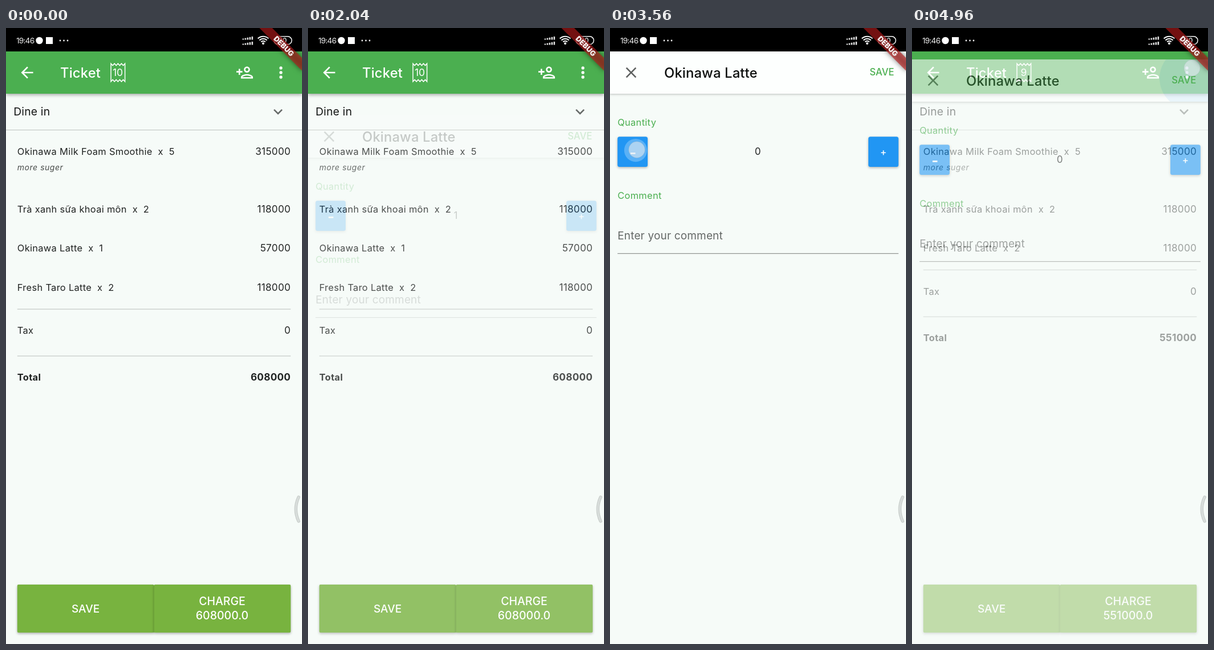
An HTML page with a canvas that plays this animation: 519 by 1078 pixels, repeating every 5000 ms.

```html
<!DOCTYPE html>
<html lang="en">
<head>
<meta charset="utf-8">
<title>Ticket</title>
<style>
html, body { margin: 0; width: 100%; height: 100%; overflow: hidden; background: #f6fbf8; }
canvas { display: block; width: 519px; height: 1078px; }
</style>
</head>
<body>
<canvas id="stage" width="519" height="1078"></canvas>
<script>
const W = 519, H = 1078, TOP = 41, LOOP = 5000;
const BG = '#f6fbf8', INK = '#202322', GREEN = '#4baf50', LIME = '#78b33f', BLUE = '#2196f3';
const FONT = 'Inter, Roboto, sans-serif';
const DP = 1.32;
const PAD = 10 * DP, EDGE = 15 * DP, TITLE = 72 * DP;

const stage = document.getElementById('stage').getContext('2d');
const layer = document.createElement('canvas');
layer.width = W;
layer.height = H;
const sheet = layer.getContext('2d');
let c = stage;

const ICONS = {
  back: 'M20 11H7.83l5.59-5.59L12 4l-8 8 8 8 1.41-1.41L7.83 13H20z',
  close: 'M19 6.41L17.59 5 12 10.59 6.41 5 5 6.41 10.59 12 5 17.59 6.41 19 12 13.41 17.59 19 19 17.59 13.41 12z',
  more: 'M16.59 8.59L12 13.17 7.41 8.59 6 10l6 6 6-6z',
  addUser: 'M15 12c2.21 0 4-1.79 4-4s-1.79-4-4-4-4 1.79-4 4 1.79 4 4 4zm0-6c1.1 0 2 .9 2 2s-.9 2-2 2-2-.9-2-2 .9-2 2-2z' +
    'm0 8c-2.67 0-8 1.34-8 4v2h16v-2c0-2.66-5.33-4-8-4zm-6 4c.22-.72 3.31-2 6-2 2.7 0 5.8 1.29 6 2H9z' +
    'm-3-3v-3h3v-2H6V7H4v3H1v2h3v3z'
};

const clamp = (v) => Math.max(0, Math.min(1, v));
const span = (t, a, b) => clamp((t - a) / (b - a));

// Cubic bezier easing, solved by bisection
function bezier(x1, y1, x2, y2) {
  const at = (a, b, s) => 3 * (1 - s) * (1 - s) * s * a + 3 * (1 - s) * s * s * b + s * s * s;
  return (x) => {
    let lo = 0, hi = 1;
    for (let i = 0; i < 24; i++) {
      const mid = (lo + hi) / 2;
      if (at(x1, x2, mid) < x) lo = mid; else hi = mid;
    }
    return at(y1, y2, lo);
  };
}
const easeIn = bezier(0.42, 0, 1, 1);
const fastOutSlowIn = bezier(0.4, 0, 0.2, 1);

function text(str, x, y, size, { color = INK, weight = 400, align = 'left', style = 'normal', gap = 0 } = {}) {
  c.font = `${style} ${weight} ${size}px ${FONT}`;
  c.letterSpacing = gap + 'px';
  c.textAlign = align;
  c.fillStyle = color;
  c.fillText(str, x, y);
}

// Text styles shared by both pages
const BODY = { gap: 0.25 * DP };
const LABEL = { ...BODY, color: GREEN };
const FIELD = { gap: 0.15 * DP };
const HEADING = { ...FIELD, weight: 500 };
const BUTTON = { color: '#fff', weight: 500, align: 'center' };

function box(x, y, w, h, color, r = 0) {
  c.fillStyle = color;
  c.beginPath();
  c.roundRect(x, y, w, h, r);
  c.fill();
}

function raised(x, y, w, h, color, r, alpha, blur, dy) {
  c.save();
  c.shadowColor = `rgba(0,0,0,${alpha})`;
  c.shadowBlur = blur;
  c.shadowOffsetY = dy;
  box(x, y, w, h, color, r);
  c.restore();
}

function disc(x, y, r, color) {
  c.fillStyle = color;
  c.beginPath();
  c.arc(x, y, r, 0, 7);
  c.fill();
}

function icon(name, x, y, color) {
  c.save();
  c.translate(x, y);
  c.scale(DP, DP);
  c.translate(-12, -12);
  c.fillStyle = color;
  c.fill(new Path2D(ICONS[name]));
  c.restore();
}

function badge(count) {
  const l = 184, r = 208.6, n = 8;
  c.beginPath();
  for (let i = 0; i <= n; i++) c.lineTo(l + (r - l) * i / n, i % 2 ? 65.6 : 62.2);
  for (let i = n; i >= 0; i--) c.lineTo(l + (r - l) * i / n, i % 2 ? 90.4 : 93.8);
  c.closePath();
  c.strokeStyle = '#fff';
  c.lineWidth = 1.5;
  c.stroke();
  text(count, 196, 84.2, 17.5, { color: '#fff', align: 'center' });
}

function row(name, value, y, weight = 400) {
  text(name, EDGE, y, 16.4, { ...BODY, weight });
  text(value, W - EDGE, y, 17.1, { ...BODY, weight, align: 'right' });
}

function ticketPage(order) {
  box(0, TOP, W, H - TOP, BG);
  raised(0, TOP, W, 74, GREEN, 0, 0.35, 6, 2);
  icon('back', 37, 78, '#fff');
  text('Ticket', TITLE, 86.5, 23.7, { ...HEADING, color: '#fff' });
  badge(order.count);
  icon('addUser', 418.5, 78, '#fff');
  for (const y of [70, 78, 86]) disc(482, y, 2.64, '#fff');

  text('Dine in', PAD, 153.4, 19.3, { ...FIELD, color: '#141615' });
  icon('more', 477, 146.5, '#666a68');
  box(0, 178, W, 1, '#bec3c0');

  row('Okinawa Milk Foam Smoothie\u00a0 x\u00a0 5', '315000', 222.2);
  text('more suger', EDGE, 248.5, 14, { color: '#484c4a', style: 'italic', gap: 0.4 * DP });
  let y = 322.5;
  for (const [name, price] of order.items) {
    row(name, price, y);
    y += 68.7;
  }
  const end = y - 36.6;
  box(EDGE, end - 0.5, W - 2 * EDGE, 1.1, '#b9bebb');
  row('Tax', '0', end + 43.4);
  box(EDGE, end + 81.5, W - 2 * EDGE, 1.1, '#b9bebb');
  row('Total', order.total, end + 124.8, 700);

  const half = W / 2 - EDGE;
  for (const x of [EDGE, W / 2]) raised(x, 974, half, 84, LIME, 2, 0.3, 4, 2);
  box(259, 975, 1, 83, '#6ca338');
  text('SAVE', 139.5, 1022.8, 19, BUTTON);
  text('CHARGE', 379, 1010.2, 19.5, BUTTON);
  text(order.total + '.0', 379, 1035.2, 19.5, BUTTON);
}

const latte = ['Okinawa Latte\u00a0 x\u00a0 1', '57000'];
const tea = ['Trà xanh sữa khoai môn\u00a0 x\u00a0 2', '118000'];
const taro = ['Fresh Taro Latte\u00a0 x\u00a0 2', '118000'];
const before = { count: '10', items: [tea, latte, taro], total: '608000' };
const after = { count: '9', items: [tea, taro], total: '551000' };

// Ripple clipped to the rectangle of its button
function ripple(x, y, r, color, clip) {
  c.save();
  c.beginPath();
  c.roundRect(...clip);
  c.clip();
  disc(x, y, r, color);
  c.restore();
}

function editPage(t) {
  box(0, TOP, W, H - TOP, BG);
  raised(0, TOP, W, 74, '#fdfffe', 0, 0.26, 4, 1);
  icon('close', 37, 78, '#5e6160');
  text('Okinawa Latte', TITLE, 86.5, 23.7, { ...HEADING, color: '#0c0e0d' });
  if (t > 4800) {
    const r = 8 + 46 * span(t, 4800, 4960);
    ripple(488, 74, r, 'rgba(33,150,243,0.13)', [434, TOP, 85, 74, 0]);
  }
  text('SAVE', 476.7, 83.2, 16.6, { ...BUTTON, color: GREEN });

  const side = 40 * DP;
  text('Quantity', PAD, 171, 16.4, LABEL);
  for (const x of [PAD, W - PAD - side]) raised(x, 190.2, side, side, BLUE, 3.5, 0.3, 4, 1.5);
  text('-', 40.3, 227.3, 26, { ...BUTTON, weight: 600 });
  text('+', 479.5, 222.8, 17, BUTTON);
  if (t > 3430 && t < 3720) {
    const out = span(t, 3560, 3720);
    const r = 6 + 14 * span(t, 3430, 3560) + 20 * out;
    ripple(45, 214, r, `rgba(255,255,255,${0.26 * (1 - out)})`, [PAD, 190.2, side, side, 3.5]);
  }
  text(t < 3520 ? '1' : '0', 259, 222.2, 17, { align: 'center' });

  text('Comment', PAD, 299.2, 16.4, LABEL);
  text('Enter your comment', PAD, 370, 18.95, { ...FIELD, color: '#646866' });
  box(PAD, 394, W - 2 * PAD, 1.3, '#929694');
}

function touch(x, y) {
  disc(x, y, 14.2, 'rgba(226,234,240,0.6)');
  c.strokeStyle = 'rgba(160,172,178,0.3)';
  c.lineWidth = 1;
  c.stroke();
}

function statusBar() {
  box(0, 0, W, TOP, '#000');
  text('19:46', 18, 27, 13.7, { color: '#eee', gap: -0.8 });
  disc(58.5, 22, 6.2, '#fff');
  box(70, 16, 12, 12, '#fff');
  for (const x of [95, 101.5, 108]) disc(x, 22, 1.4, '#eee');

  for (let i = 0; i < 5; i++) {
    const h = 2 + i * 0.9;
    box(414.5 + i * 4, 20.5 - h, 2.6, h, '#ddd');
    box(414.5 + i * 4, 29.5 - h, 2.6, h, '#ddd');
  }

  c.strokeStyle = '#fff';
  c.lineWidth = 2.1;
  for (const r of [5.3, 9.3, 13.3]) {
    c.beginPath();
    c.arc(451, 28, r, -Math.PI * 0.75, -Math.PI * 0.25);
    c.stroke();
  }
  disc(451, 27, 2, '#fff');

  c.lineWidth = 1.5;
  c.beginPath();
  c.roundRect(470, 14.8, 31, 14, 7);
  c.stroke();
  text('20', 485, 26, 11.5, { color: '#fff', weight: 600, align: 'center' });
}

function banner() {
  c.save();
  c.translate(W, 0);
  c.rotate(Math.PI / 4);
  const far = 40 * DP, thick = 12 * DP;
  c.save();
  c.shadowColor = 'rgba(0,0,0,0.8)';
  c.shadowBlur = 10;
  box(-far, far - thick, far * 2, thick, 'rgba(183,28,28,0.63)');
  c.restore();
  text('DEBUG', 0, far - thick / 2 + 4.6, 12.7, { color: '#f4eeee', weight: 900, align: 'center' });
  c.restore();
}

function handle() {
  c.lineCap = 'round';
  for (const [w, color] of [[5.4, '#c2c8c5'], [3.6, '#d8dddb']]) {
    c.lineWidth = w;
    c.strokeStyle = color;
    c.beginPath();
    c.moveTo(513, 821);
    c.quadraticCurveTo(503.5, 842, 513, 863);
    c.stroke();
  }
  c.lineCap = 'butt';
}

function draw(t) {
  c = stage;
  c.clearRect(0, 0, W, H);
  ticketPage(t < 4870 ? before : after);

  // The edit page fades and slides up from a quarter of the height
  const p = t < 3000 ? span(t, 1925, 2225) : 1 - span(t, 4877, 5177);
  if (p > 0) {
    c = sheet;
    c.clearRect(0, 0, W, H);
    c.save();
    c.beginPath();
    c.rect(0, TOP, W, H - TOP);
    c.clip();
    editPage(t);
    c.restore();
    c = stage;
    c.globalAlpha = easeIn(p);
    c.drawImage(layer, 0, Math.round((1 - fastOutSlowIn(p)) * H / 4));
    c.globalAlpha = 1;
  }

  statusBar();
  if (t > 3420 && t < 3600) touch(47, 213);
  if (t > 4800) touch(491, 70);
  handle();
  banner();
}

const start = performance.now();
function tick(now) {
  draw(Math.max(0, now - start) % LOOP);
  requestAnimationFrame(tick);
}
draw(0);
requestAnimationFrame(tick);
</script>
</body>
</html>
```
